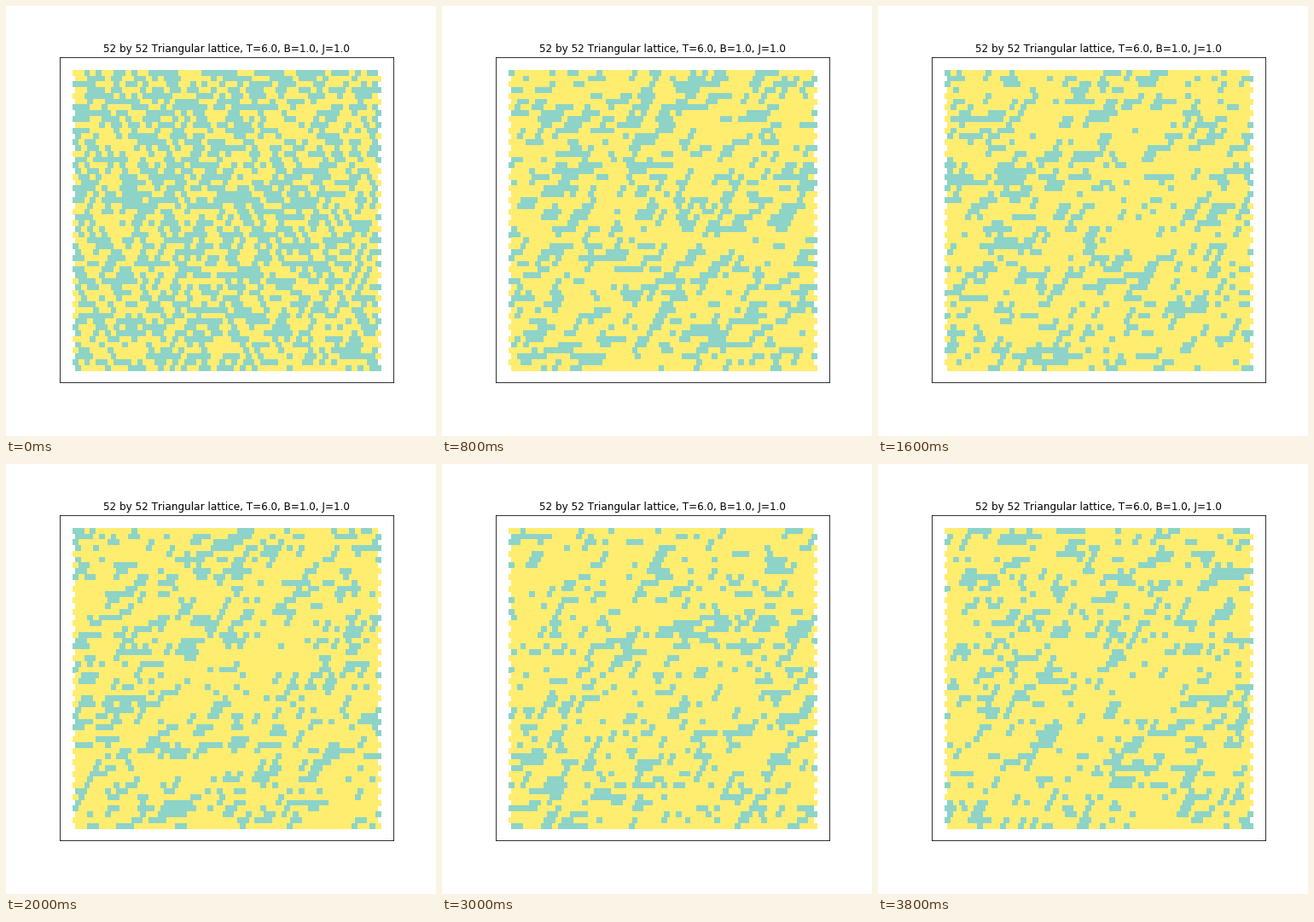
A matplotlib script for the animation above (4000 ms loop, 504 px wide and 504 px high).

```python
import math

import matplotlib.pyplot as plt
import numpy as np
from matplotlib.animation import FuncAnimation

SIZE = 52
TEMP, FIELD, COUPLING = 6.0, 1.0, 1.0
FRAMES, INTERVAL = 20, 200

# Bond strengths along rows, rising diagonals and falling diagonals.
ROW, RISING, FALLING = 2 * COUPLING, 2 * COUPLING, -COUPLING

plt.rcParams["text.kerning_factor"] = 6
rng = np.random.default_rng(52)


def local_field(s, r, c):
    """Pull on one spin; odd rows sit half a cell to the right."""
    up, down = s[r - 1], s[(r + 1) % SIZE]
    left = (c + r % 2 - 1) % SIZE
    right = (left + 1) % SIZE
    return (FIELD
            + ROW * (s[r][c - 1] + s[r][(c + 1) % SIZE])
            + RISING * (up[right] + down[left])
            + FALLING * (up[left] + down[right]))


def sweep(spins):
    """One Metropolis sweep over randomly chosen sites, periodic edges."""
    s = spins.tolist()
    count = SIZE * SIZE
    sites = rng.integers(SIZE, size=(count, 2)).tolist()
    for (r, c), u in zip(sites, rng.random(count).tolist()):
        cost = 2 * s[r][c] * local_field(s, r, c)
        if cost <= 0 or u < math.exp(-cost / TEMP):
            s[r][c] = -s[r][c]
    return np.array(s)


states = [rng.choice([-1, 1], size=(SIZE, SIZE))]
while len(states) < FRAMES:
    states.append(sweep(states[-1]))

fig, ax = plt.subplots(figsize=(7, 7), dpi=72, facecolor="white")
fig.subplots_adjust(left=0.125, right=0.9, bottom=0.125, top=0.88)

rows, cols = np.mgrid[:SIZE, :SIZE]
cells = ax.scatter((cols + 0.5 * (rows % 2)).ravel(), rows.ravel(),
                   c=states[0].ravel(), s=36, marker="s", linewidths=1,
                   edgecolors="face", cmap="Set3", vmin=-1, vmax=1)
ax.margins(0.05)
ax.invert_yaxis()
ax.set_xticks([])
ax.set_yticks([])
ax.set_title(f"{SIZE} by {SIZE} Triangular lattice, "
             f"T={TEMP}, B={FIELD}, J={COUPLING}",
             fontsize=12, fontfamily="DejaVu Sans")


def update(i):
    cells.set_array(states[i].ravel())
    return (cells,)


anim = FuncAnimation(fig, update, frames=FRAMES, interval=INTERVAL,
                     repeat=True, repeat_delay=0, blit=False)
plt.show()
```
